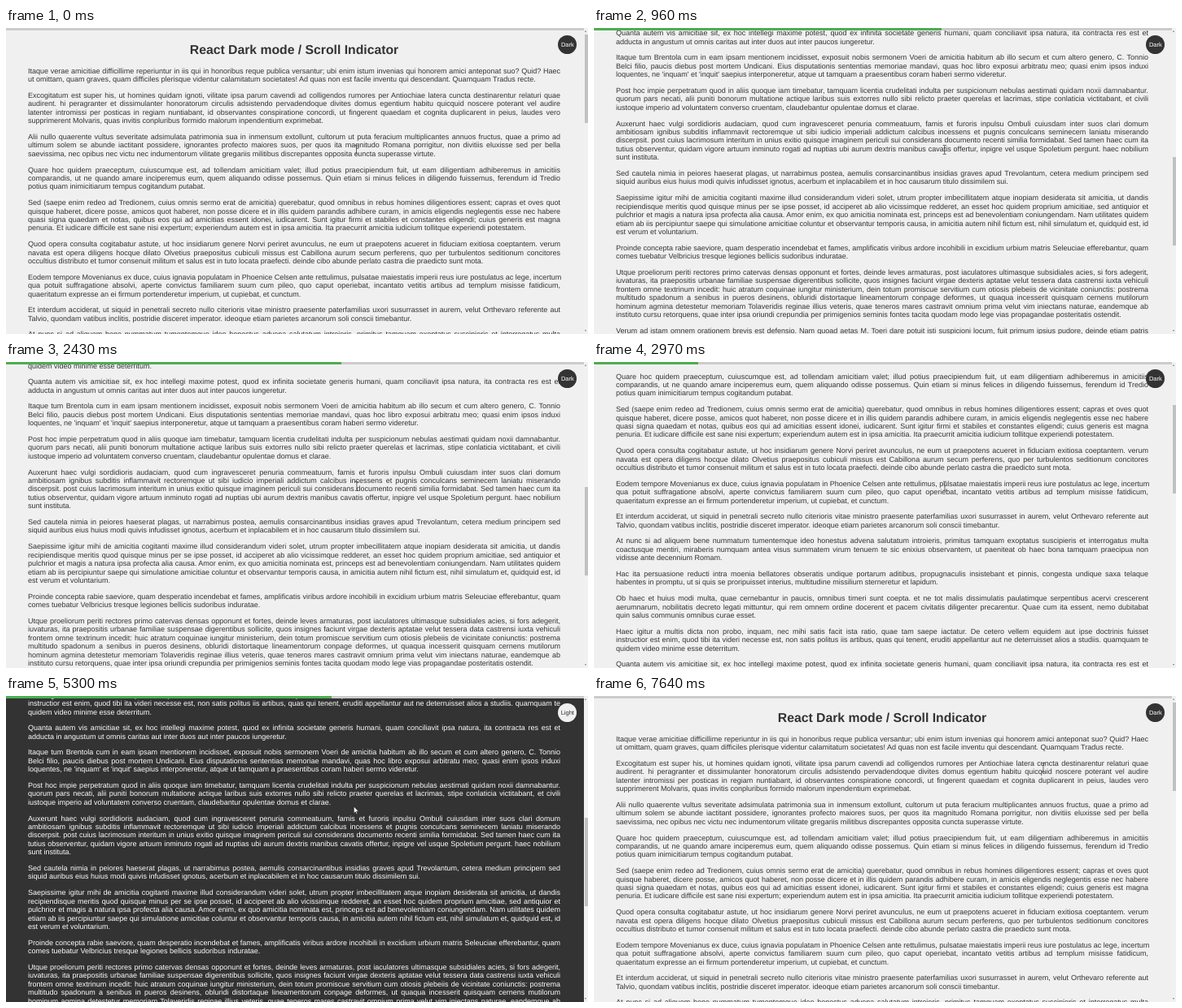
Write an HTML page that moves like this. It is 715 px wide and 377 px high and loops after 7730 ms.

```html
<!DOCTYPE html>
<html lang="la">
<head>
<meta charset="utf-8">
<title>Scroll Indicator</title>
<style>
html, body { margin: 0; width: 100%; height: 100%; overflow: hidden; }
body { position: relative; background: #f0f0f0; font: 9px/10.44px Arial, "Liberation Sans", sans-serif; text-rendering: geometricPrecision; }
#page { position: absolute; left: 27px; top: 0; width: 654px; }
h1 { position: absolute; top: 19px; left: 0; width: 100%; margin: 0; font-size: 15.75px; line-height: 18px; text-align: center; white-space: nowrap; }
#text { padding-top: 47.8px; }
p { margin: 0 0 9.28px; text-align: justify; }
p div { height: 10.44px; white-space: nowrap; text-align-last: justify; }
p div:last-child { text-align-last: left; }
#bar { position: absolute; left: 0; top: 0; width: 711px; height: 3px; background: #ccc; }
#fill { height: 100%; background: #4caf50; }
#track { position: absolute; right: 0; top: 0; width: 5px; height: 100%; background: #f1f1f1; }
#thumb { position: absolute; left: .6px; width: 4px; top: 8px; height: 109px; background: #c1c1c1; }
.arrow { position: absolute; left: 1px; border: solid transparent; border-width: 0 1.7px; }
#up { top: 3px; border-bottom: 2px solid #777; }
#down { bottom: 3px; border-top: 2px solid #777; }
#button { position: absolute; left: 678.3px; top: 8.5px; width: 23px; height: 23px; border-radius: 50%; font-size: 7.5px; line-height: 23px; text-align: center; }
#mouse { position: absolute; left: 0; top: 0; width: 16px; height: 18px; overflow: visible; }
</style>
</head>
<body>
<div id="page">
<h1>React Dark mode / Scroll Indicator</h1>
<div id="text">
<p>Itaque verae amicitiae difficillime reperiuntur in iis qui in honoribus reque publica versantur; ubi enim istum invenias qui honorem amici anteponat suo? Quid? Haec
ut omittam, quam graves, quam difficiles plerisque videntur calamitatum societates! Ad quas non est facile inventu qui descendant. Quamquam Tradus recte.</p>
<p>Excogitatum est super his, ut homines quidam ignoti, vilitate ipsa parum cavendi ad colligendos rumores per Antiochiae latera cuncta destinarentur relaturi quae
audirent. hi peragranter et dissimulanter honoratorum circulis adsistendo pervadendoque divites domus egentium habitu quicquid noscere poterant vel audire
latenter intromissi per posticas in regiam nuntiabant, id observantes conspiratione concordi, ut fingerent quaedam et cognita duplicarent in peius, laudes vero
supprimerent Molvaris, quas invitis conpluribus formido malorum inpendentium exprimebat.</p>
<p>Alii nullo quaerente vultus severitate adsimulata patrimonia sua in inmensum extollunt, cultorum ut puta feracium multiplicantes annuos fructus, quae a primo ad
ultimum solem se abunde iactitant possidere, ignorantes profecto maiores suos, per quos ita magnitudo Romana porrigitur, non divitiis eluxisse sed per bella
saevissima, nec opibus nec victu nec indumentorum vilitate gregariis militibus discrepantes opposita cuncta superasse virtute.</p>
<p>Quare hoc quidem praeceptum, cuiuscumque est, ad tollendam amicitiam valet; illud potius praecipiendum fuit, ut eam diligentiam adhiberemus in amicitiis
comparandis, ut ne quando amare inciperemus eum, quem aliquando odisse possemus. Quin etiam si minus felices in diligendo fuissemus, ferendum id Tredio
potius quam inimicitiarum tempus cogitandum putabat.</p>
<p>Sed (saepe enim redeo ad Tredionem, cuius omnis sermo erat de amicitia) querebatur, quod omnibus in rebus homines diligentiores essent; capras et oves quot
quisque haberet, dicere posse, amicos quot haberet, non posse dicere et in illis quidem parandis adhibere curam, in amicis eligendis neglegentis esse nec habere
quasi signa quaedam et notas, quibus eos qui ad amicitias essent idonei, iudicarent. Sunt igitur firmi et stabiles et constantes eligendi; cuius generis est magna
penuria. Et iudicare difficile est sane nisi expertum; experiendum autem est in ipsa amicitia. Ita praecurrit amicitia iudicium tollitque experiendi potestatem.</p>
<p>Quod opera consulta cogitabatur astute, ut hoc insidiarum genere Norvi periret avunculus, ne eum ut praepotens acueret in fiduciam exitiosa coeptantem. verum
navata est opera diligens hocque dilato Olvetius praepositus cubiculi missus est Cabillona aurum secum perferens, quo per turbulentos seditionum concitores
occultius distributo et tumor consenuit militum et salus est in tuto locata praefecti. deinde cibo abunde perlato castra die praedicto sunt mota.</p>
<p>Eodem tempore Movenianus ex duce, cuius ignavia populatam in Phoenice Celsen ante rettulimus, pulsatae maiestatis imperii reus iure postulatus ac lege, incertum
qua potuit suffragatione absolvi, aperte convictus familiarem suum cum pileo, quo caput operiebat, incantato vetitis artibus ad templum misisse fatidicum,
quaeritatum expresse an ei firmum portenderetur imperium, ut cupiebat, et cunctum.</p>
<p>Et interdum acciderat, ut siquid in penetrali secreto nullo citerioris vitae ministro praesente paterfamilias uxori susurrasset in aurem, velut Orthevaro referente aut
Talvio, quondam vatibus inclitis, postridie disceret imperator. ideoque etiam parietes arcanorum soli conscii timebantur.</p>
<p>At nunc si ad aliquem bene nummatum tumentemque ideo honestus advena salutatum introieris, primitus tamquam exoptatus suscipieris et interrogatus multa
coactusque mentiri, miraberis numquam antea visus summatem virum tenuem te sic enixius observantem, ut paeniteat ob haec bona tamquam praecipua non
vidisse ante decennium Romam.</p>
<p>Hac ita persuasione reducti intra moenia bellatores obseratis undique portarum aditibus, propugnaculis insistebant et pinnis, congesta undique saxa telaque
habentes in promptu, ut si quis se proripuisset interius, multitudine missilium sterneretur et lapidum.</p>
<p>Ob haec et huius modi multa, quae cernebantur in paucis, omnibus timeri sunt coepta. et ne tot malis dissimulatis paulatimque serpentibus acervi crescerent
aerumnarum, nobilitatis decreto legati mittuntur, qui rem omnem ordine docerent et pacem civitatis diligenter precarentur.  Quae cum ita essent, nemo dubitabat
quin salus communis omnibus curae esset.</p>
<p>Haec igitur a multis dicta non probo, inquam, nec mihi satis facit ista ratio, quae tam saepe iactatur. De cetero vellem equidem aut ipse doctrinis fuisset
instructior est enim, quod tibi ita videri necesse est, non satis politus iis artibus, quas qui tenent, eruditi appellantur aut ne deterruisset alios a studiis. quamquam te
quidem video minime esse deterritum.</p>
<p>Quanta autem vis amicitiae sit, ex hoc intellegi maxime potest, quod ex infinita societate generis humani, quam conciliavit ipsa natura, ita contracta res est et
adducta in angustum ut omnis caritas aut inter duos aut inter paucos iungeretur.</p>
<p>Itaque tum Brentola cum in eam ipsam mentionem incidisset, exposuit nobis sermonem Voeri de amicitia habitum ab illo secum et cum altero genero, C. Tonnio
Belci filio, paucis diebus post mortem Undicani. Eius disputationis sententias memoriae mandavi, quas hoc libro exposui arbitratu meo; quasi enim ipsos induxi
loquentes, ne 'inquam' et 'inquit' saepius interponeretur, atque ut tamquam a praesentibus coram haberi sermo videretur.</p>
<p>Post hoc impie perpetratum quod in aliis quoque iam timebatur, tamquam licentia crudelitati indulta per suspicionum nebulas aestimati quidam noxii damnabantur.
quorum pars necati, alii puniti bonorum multatione actique laribus suis extorres nullo sibi relicto praeter querelas et lacrimas, stipe conlaticia victitabant, et civili
iustoque imperio ad voluntatem converso cruentam, claudebantur opulentae domus et clarae.</p>
<p>Auxerunt haec vulgi sordidioris audaciam, quod cum ingravesceret penuria commeatuum, famis et furoris inpulsu Ombuli cuiusdam inter suos clari domum
ambitiosam ignibus subditis inflammavit rectoremque ut sibi iudicio imperiali addictum calcibus incessens et pugnis conculcans seminecem laniatu miserando
discerpsit. post cuius lacrimosum interitum in unius exitio quisque imaginem periculi sui considerans documento recenti similia formidabat. Sed tamen haec cum ita
tutius observentur, quidam vigore artuum inminuto rogati ad nuptias ubi aurum dextris manibus cavatis offertur, inpigre vel usque Spoletium pergunt. haec nobilium
sunt instituta.</p>
<p>Sed cautela nimia in peiores haeserat plagas, ut narrabimus postea, aemulis consarcinantibus insidias graves apud Trevolantum, cetera medium principem sed
siquid auribus eius huius modi quivis infudisset ignotus, acerbum et inplacabilem et in hoc causarum titulo dissimilem sui.</p>
<p>Saepissime igitur mihi de amicitia cogitanti maxime illud considerandum videri solet, utrum propter imbecillitatem atque inopiam desiderata sit amicitia, ut dandis
recipiendisque meritis quod quisque minus per se ipse posset, id acciperet ab alio vicissimque redderet, an esset hoc quidem proprium amicitiae, sed antiquior et
pulchrior et magis a natura ipsa profecta alia causa. Amor enim, ex quo amicitia nominata est, princeps est ad benevolentiam coniungendam. Nam utilitates quidem
etiam ab iis percipiuntur saepe qui simulatione amicitiae coluntur et observantur temporis causa, in amicitia autem nihil fictum est, nihil simulatum et, quidquid est, id
est verum et voluntarium.</p>
<p>Proinde concepta rabie saeviore, quam desperatio incendebat et fames, amplificatis viribus ardore incohibili in excidium urbium matris Seleuciae efferebantur, quam
comes tuebatur Velbricius tresque legiones bellicis sudoribus induratae.</p>
<p>Utque proeliorum periti rectores primo catervas densas opponunt et fortes, deinde leves armaturas, post iaculatores ultimasque subsidiales acies, si fors adegerit,
iuvaturas, ita praepositis urbanae familiae suspensae digerentibus sollicite, quos insignes faciunt virgae dexteris aptatae velut tessera data castrensi iuxta vehiculi
frontem omne textrinum incedit: huic atratum coquinae iungitur ministerium, dein totum promiscue servitium cum otiosis plebeiis de vicinitate coniunctis: postrema
multitudo spadonum a senibus in pueros desinens, obluridi distortaque lineamentorum conpage deformes, ut quaqua incesserit quisquam cernens mutilorum
hominum agmina detestetur memoriam Tolaveridis reginae illius veteris, quae teneros mares castravit omnium prima velut vim iniectans naturae, eandemque ab
instituto cursu retorquens, quae inter ipsa oriundi crepundia per primigenios seminis fontes tacita quodam modo lege vias propagandae posteritatis ostendit.</p>
<p>Verum ad istam omnem orationem brevis est defensio. Nam quoad aetas M. Toeri dare potuit isti suspicioni locum, fuit primum ipsius pudore, deinde etiam patris
diligentia disciplinaque munita. Qui ut huic virilem togam dedit, nihil dicam hoc loco de me; tantum sit, quantum vos existimatis; hoc dicam, hunc a patre continuo
ad me esse deductum, cum artibus honestissimis erudiretur.</p>
<p>Sed quid est quod in hac causa maxime homines admirentur et reprehendant meum consilium, cum ego idem antea multa decreverim, quae magis ad hominis dignitatem quam ad rei publicae necessitatem pertinerent?</p>
<p>Nunc vero inanes flatus quorundam vile esse quicquid extra urbis pomerium nascitur aestimant praeter orbos et caelibes, nec credi potest qua obsequiorum diversitate coluntur homines sine liberis Romae.</p>
<p>Cum saepe multa, tum memini domi in hemicyclio sedentem, ut solebat, cum et ego essem una et pauci admodum familiares, in eum sermonem illum incidere qui tum forte multis erat in ore. Meministi enim profecto, et eo magis, quod utebare multum, quanta esset hominum vel admiratio vel querella.</p>
<p>Ibi victu recreati et quiete, postquam abierat timor, vicos opulentos adorti equestrium adventu cohortium, quae casu propinquabant, nec resistere planitie porrecta conati digressi sunt retroque concedentes omne iuventutis robur relictum in sedibus acciverunt.</p>
<p>Quibus occurrere bene pertinax miles explicatis ordinibus parans hastisque feriens scuta qui habitus iram pugnantium concitat et dolorem proximos iam gestu terrebat sed eum in certamen alacriter consurgentem revocavere ductores rati intempestivum anceps subire certamen cum haut longe muri distarent.</p>
<p>Haec subinde acta sunt, et quae postea secuta, suo loco dicentur a nobis, ne quid omissum esse videatur eorum quae ad rem pertinent.</p>
</div>
</div>
<div id="bar"><div id="fill"></div></div>
<div id="track"><i id="up" class="arrow"></i><div id="thumb"></div><i id="down" class="arrow"></i></div>
<div id="button">Dark</div>
<svg id="mouse">
  <path id="beam" d="M-2 -5.5H-.4L0 -5L.4 -5.5H2M0 -5V5M-2 5.5H-.4L0 5L.4 5.5H2" fill="none" stroke-width=".8"/>
  <path id="pointer" d="M0 0V8.4L2 6.7L3.3 9.6L4.6 9L3.3 6.2H6Z" fill="#fff" stroke="#111" stroke-width=".6"/>
  <path id="hand" d="M-1 0Q0 -1 1 0V4L5 5Q6 5.3 6 6.5L5 11H-.5L-3.5 6.5Q-3 5 -1 7Z" fill="#fff" stroke="#111" stroke-width=".7"/>
</svg>
<script>
const $ = id => document.getElementById(id);
const LOOP = 7730, MAX_SCROLL = 871;

// bursts of screen updates: start, end, count
const bursts = [
  [80, 800, 10], [870, 1260, 6], [1950, 2270, 5], [2430, 2680, 4], [2820, 3060, 4],
  [3200, 3200, 1], [3430, 4150, 10], [4300, 5000, 10], [5080, 5300, 4], [5610, 5610, 1],
  [5760, 6480, 10], [6570, 7330, 11], [7420, 7640, 4]
];
const scrollKeys = [
  [0, 0], [80, 20], [480, 200], [800, 400], [945, 523], [965, 523], [1260, 760],
  [1950, 725], [2270, 560], [2430, 505], [2680, 290], [2820, 235], [3060, 0],
  [4760, 0], [5000, 200], [5080, 270], [5300, 490], [5760, 460], [6235, 7], [6325, 7], [6480, 0]
];
const darkKeys = [[4150, 0], [4300, .01], [4620, 1], [7330, 1], [7420, .75], [7640, 0]];
const xKeys = [[0, 430.5], [3200, 431], [4150, 689.5], [4300, 689.5], [4720, 426], [5610, 428], [5760, 424.5], [6480, 424.5], [7250, 689.5], [7330, 689.5], [7640, 552]];
const yKeys = [[0, 150], [2270, 150], [2430, 153], [3200, 152.5], [4150, 21], [4300, 21], [4720, 136], [5300, 136], [5610, 140.5], [5760, 131], [6480, 131], [7250, 21], [7330, 21], [7640, 88]];

function at(keys, t) {
  if (t <= keys[0][0]) return keys[0][1];
  for (let i = 1; i < keys.length; i++) {
    const [t0, v0] = keys[i - 1], [t1, v1] = keys[i];
    if (t <= t1) return v0 + (v1 - v0) * (t - t0) / (t1 - t0);
  }
  return keys[keys.length - 1][1];
}

function snap(t) {
  let last = 0;
  for (const [a, b, n] of bursts) {
    if (t < a) break;
    const step = (b - a) / (n - 1 || 1) || 1;
    last = Math.min(b, a + Math.floor((t - a) / step + 1e-6) * step);
  }
  return last;
}

const grey = (a, b, k) => {
  const v = Math.round(a + (b - a) * k);
  return `rgb(${v},${v},${v})`;
};

function splitLines() {
  for (const p of document.querySelectorAll("p")) {
    const lines = p.textContent.split("\n");
    if (lines.length < 2) continue;
    p.replaceChildren(...lines.map(line => {
      const div = document.createElement("div");
      div.textContent = line;
      return div;
    }));
  }
}

function drawMouse(t, dark) {
  const x = at(xKeys, t), y = at(yKeys, t);
  const onButton = Math.hypot(x - 690, y - 20) < 11.5;
  const plain = x > 681 || (t >= 4700 && t < 5610);
  const shape = onButton ? "hand" : plain ? "pointer" : "beam";
  for (const id of ["hand", "pointer", "beam"]) $(id).style.display = id === shape ? "" : "none";
  $("beam").style.stroke = grey(70, 235, dark);
  $("mouse").style.transform = `translate(${x}px,${y}px)`;
}

function draw(now) {
  const t = snap(now % LOOP);
  const scroll = at(scrollKeys, t), dark = at(darkKeys, t);
  const part = scroll / MAX_SCROLL;
  document.body.style.background = grey(240, 51, dark);
  $("page").style.transform = `translateY(${-scroll}px)`;
  $("page").style.color = grey(51, 255, dark);
  $("fill").style.width = part * 100 + "%";
  $("thumb").style.top = 8 + part * 252 + "px";
  const button = $("button");
  button.textContent = t >= 4300 && t < 7330 ? "Light" : "Dark";
  button.style.background = grey(51, 240, dark);
  button.style.color = grey(255, 51, dark);
  drawMouse(t, dark);
}

splitLines();
const start = performance.now();
(function loop() {
  draw(performance.now() - start);
  requestAnimationFrame(loop);
})();
</script>
</body>
</html>
```
